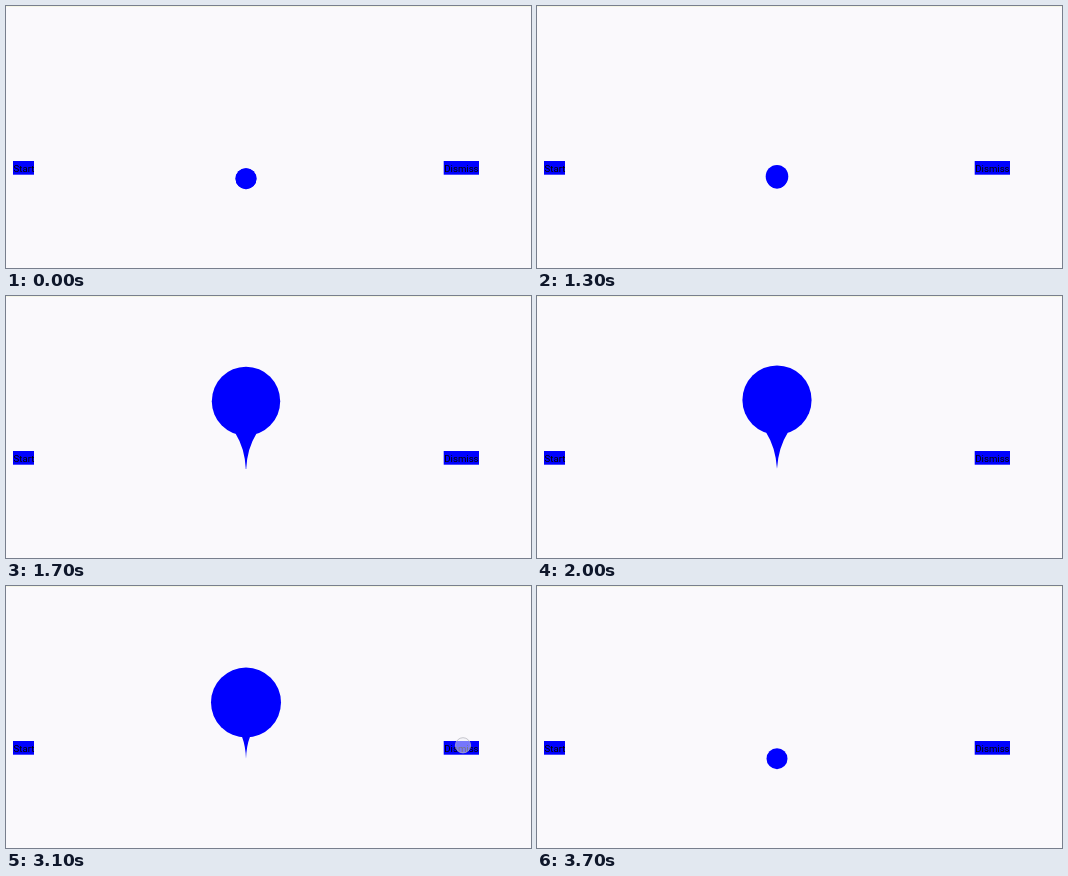
An HTML page with a canvas for the animation above (7.2 s loop, 525 px wide and 262 px high).

```html
<!DOCTYPE html>
<html lang="en">
<head>
<meta charset="utf-8">
<title>Balloon pin</title>
<style>
html, body { margin: 0; width: 100%; height: 100%; overflow: hidden; background: #faf9fc; }
canvas { display: block; }
</style>
</head>
<body>
<canvas id="stage"></canvas>
<script>
const W = 525, H = 262, LOOP = 7200, STEP = 100;
const BLUE = '#0000ff', X = 240, BASE = 172.7;

const canvas = document.getElementById('stage');
const ratio = window.devicePixelRatio || 1;
canvas.width = W * ratio;
canvas.height = H * ratio;
canvas.style.width = W + 'px';
canvas.style.height = H + 'px';
const ctx = canvas.getContext('2d');
ctx.scale(ratio, ratio);

// time, centre y, radius x, radius y, tail half width, bulb radius
const keys = [
  [1200, 172.7, 10.5, 10.5, 0, 10.5],
  [1300, 170.5, 11.3, 11.5, 0, 10],
  [1400, 162, 15, 16, 6, 8],
  [1500, 144.5, 21, 22.5, 5.5, 6],
  [1600, 107, 33.5, 34.5, 10, 1],
  [1700, 105.2, 34.2, 34.5, 10.5, 0.3],
  [2000, 104, 34.6, 34.6, 11, 0],
  [2400, 102.3, 35, 35, 12, 0],
  [3000, 102.3, 35, 35, 12, 0],
  [3100, 116.5, 35, 35, 4, 0],
  [3200, 139, 32.5, 32.5, 0, 0],
  [3300, 158, 22, 22, 0, 0],
  [3400, 167.5, 14.5, 14.5, 0, 0],
  [3500, 171, 11.7, 11.7, 0, 0],
  [3700, 172.7, 10.5, 10.5, 0, 0]
];

function poseAt(t) {
  const next = keys.findIndex(k => k[0] > t);
  if (next === 0) return keys[0];
  if (next < 0) return keys[keys.length - 1];
  const a = keys[next - 1], b = keys[next];
  const p = (t - a[0]) / (b[0] - a[0]);
  return a.map((v, i) => v + (b[i] - v) * p);
}

function oval(x, y, rx, ry = rx) {
  ctx.beginPath();
  ctx.ellipse(x, y, rx, ry, 0, 0, Math.PI * 2);
  ctx.fill();
}

function tail(y, rx, ry, w, bulb) {
  const top = y + ry * Math.sqrt(1 - (w / rx) ** 2) - 0.5;
  if (w <= 0 || top >= BASE) return;
  const end = bulb * 0.7;
  const side = Math.max(end * 0.9, w * 0.12);
  const bend = top + (BASE - top) * 0.42;
  ctx.beginPath();
  ctx.moveTo(X - w, top);
  ctx.quadraticCurveTo(X - side, bend, X - end, BASE);
  ctx.lineTo(X + end, BASE);
  ctx.quadraticCurveTo(X + side, bend, X + w, top);
  ctx.fill();
}

function balloon(t) {
  const [, y, rx, ry, w, bulb] = poseAt(t);
  ctx.fillStyle = BLUE;
  tail(y, rx, ry, w, bulb);
  oval(X, y, rx, ry);
  if (bulb > 0) oval(X, BASE, bulb);
}

function label(text, x, w) {
  ctx.fillStyle = BLUE;
  ctx.fillRect(x, 155, w, 13.7);
  ctx.fillStyle = '#000';
  ctx.fillText(text, x + 0.6, 165.8);
}

function touch(x, y, alpha) {
  ctx.globalAlpha = alpha;
  ctx.fillStyle = 'rgba(240,240,246,.65)';
  oval(x, y, 7.6);
  ctx.strokeStyle = '#b4b4bc';
  ctx.lineWidth = 1;
  ctx.stroke();
  ctx.globalAlpha = 1;
}

function draw(t) {
  ctx.fillStyle = '#faf9fc';
  ctx.fillRect(0, 0, W, H);
  ctx.fillStyle = '#f5f5e4';
  ctx.fillRect(0, 0, W, 1);
  ctx.font = '9.6px Roboto, sans-serif';
  label('Start', 7, 21);
  label('Dismiss', 437.7, 35.3);
  balloon(t);
  if (t >= 900 && t < 1100) touch(9.7, 159.5, t < 1000 ? 1 : 0.5);
  if (t >= 3100 && t < 3200) touch(457, 159.3, 0.75);
}

const start = performance.now();
function tick() {
  const t = (performance.now() - start) % LOOP;
  draw(Math.floor(t / STEP) * STEP);
  requestAnimationFrame(tick);
}
tick();
</script>
</body>
</html>
```
